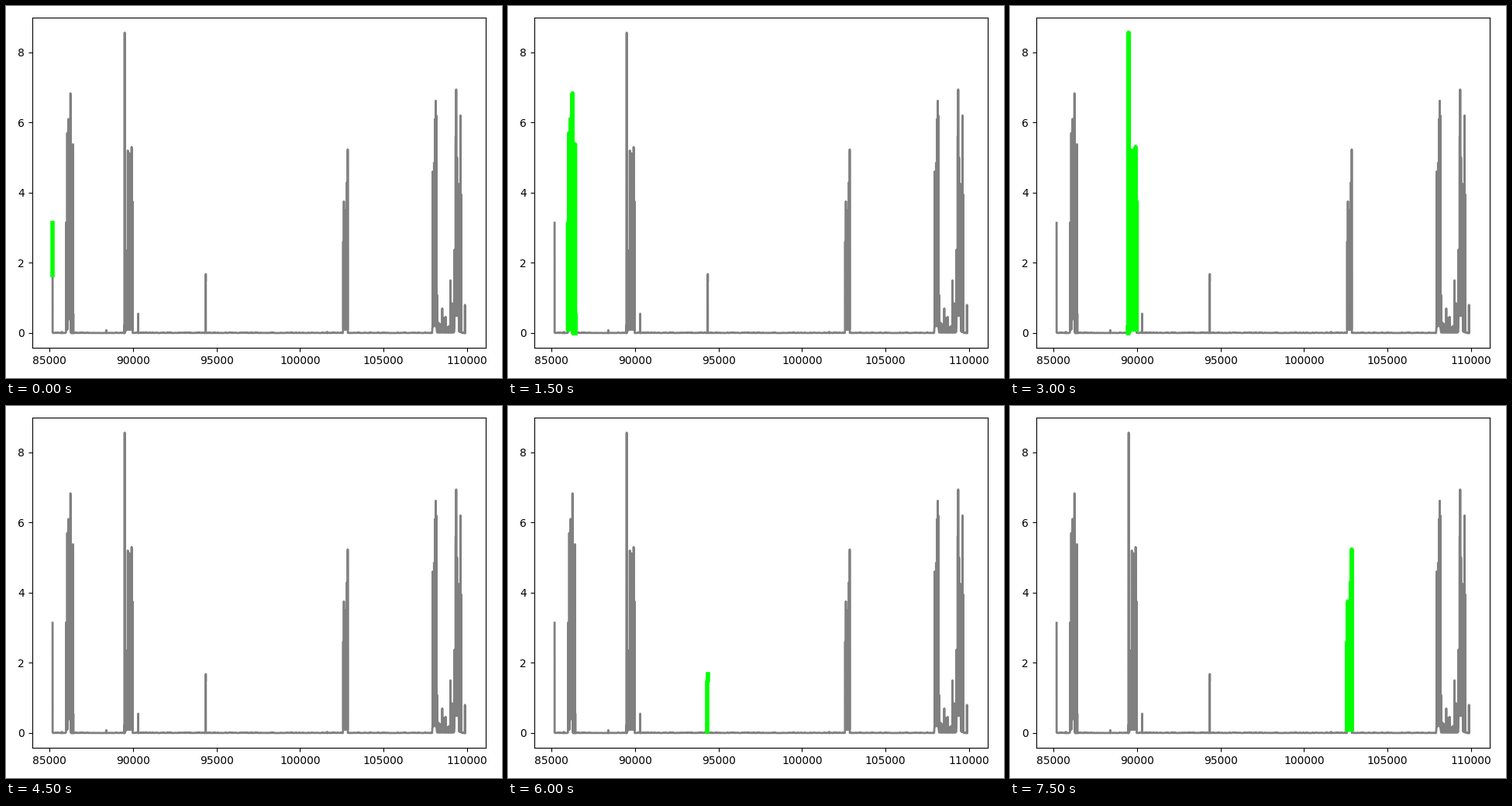
These frames come from a looping animation (640x480 px, 8 s). A matplotlib script:

```python
import matplotlib.pyplot as plt
import numpy as np
from matplotlib.animation import FuncAnimation

W, H, DPI = 640, 480, 100
STEP_MS, FRAMES, HOLD = 500, 16, 3
START, END = 85190, 109870

rng = np.random.default_rng(4)


def spike(t, top, low=0.0):
    return [(t, low), (t + 3, top), (t + 6, low)]


def burst(low, *keys, gap=45):
    """Key spikes, with lower random ones filling the time between them."""
    out = []
    for (t, top), (t_next, top_next) in zip(keys, keys[1:]):
        out += spike(t, top, low)
        for u in np.arange(t + gap, t_next - gap / 2, gap):
            out += spike(u, min(top, top_next) * rng.uniform(0.6, 0.95), low)
    return out + spike(*keys[-1], low)


def join(parts):
    """Chain the parts in time with an almost flat line between them."""
    out = []
    for part in parts:
        if out:
            t = np.arange(out[-1][0] + 3, part[0][0], 40)
            out += zip(t, 0.02 * rng.random(len(t)) ** 4)
        out += part
    return out


lead = [(START, 3.14), (START, 1.66)]
first = (burst(0.1, (85998, 3.15), (86065, 5.7))
         + burst(0.4, (86105, 5.7), (86145, 6.1), (86258, 6.83))
         + burst(0.0, (86300, 0.4), (86405, 5.38), (86428, 0.55)))
second = spike(89468, 0.22) + spike(89500, 8.56) + burst(
    0.1, (89595, 2.35), (89690, 5.2), (89795, 5.12), (89918, 5.3),
    (89975, 3.75))
third = [(94340, 0.04), (94340, 1.48), (94360, 1.48), (94360, 1.68)]
fourth = burst(0.1, (102580, 2.6), (102622, 3.75), (102712, 3.5),
               (102805, 4.3), (102852, 5.23))
fifth = burst(0.2, (107930, 4.6), (108018, 4.85), (108078, 6.1),
              (108122, 6.62), (108153, 6.2))
grass = burst(0.02, (108205, 1.08), (108270, 0.3), (108510, 0.7),
              (108715, 0.46), (108935, 0.2), (109004, 1.5), (109090, 0.85),
              (109200, 0.5))
sixth = (burst(0.5, (109250, 2.38), (109312, 5.6), (109344, 6.94),
               (109394, 5.0), (109490, 4.25))
         + burst(0.04, (109535, 3.2), (109604, 6.2), (109644, 3.95)))

signal = join([
    lead, spike(85740, 0.03), first, spike(88400, 0.08), second,
    spike(90310, 0.55), third, spike(101630, 0.03), fourth,
    fifth + grass + sixth, spike(END - 6, 0.8),
])

# One entry per step; the empty one highlights nothing.
marks = [lead, first, second, [], third, fourth]

fig = plt.figure(figsize=(W / DPI, H / DPI), dpi=DPI)
ax = fig.add_axes([33.7 / W, 38.7 / H, 585.3 / W, 426.3 / H])
ax.set_xlim(START - 1225, END + 1243)
ax.set_ylim(-0.428, 8.988)
ax.plot(*zip(*signal), color="gray", lw=2)
(mark,) = ax.plot([], [], color="lime", lw=4)


def draw(i):
    pts = marks[i // HOLD]
    mark.set_data([t for t, _ in pts], [v for _, v in pts])
    return (mark,)


anim = FuncAnimation(fig, draw, frames=FRAMES, interval=STEP_MS,
                     repeat=True, repeat_delay=0)
plt.show()
```
